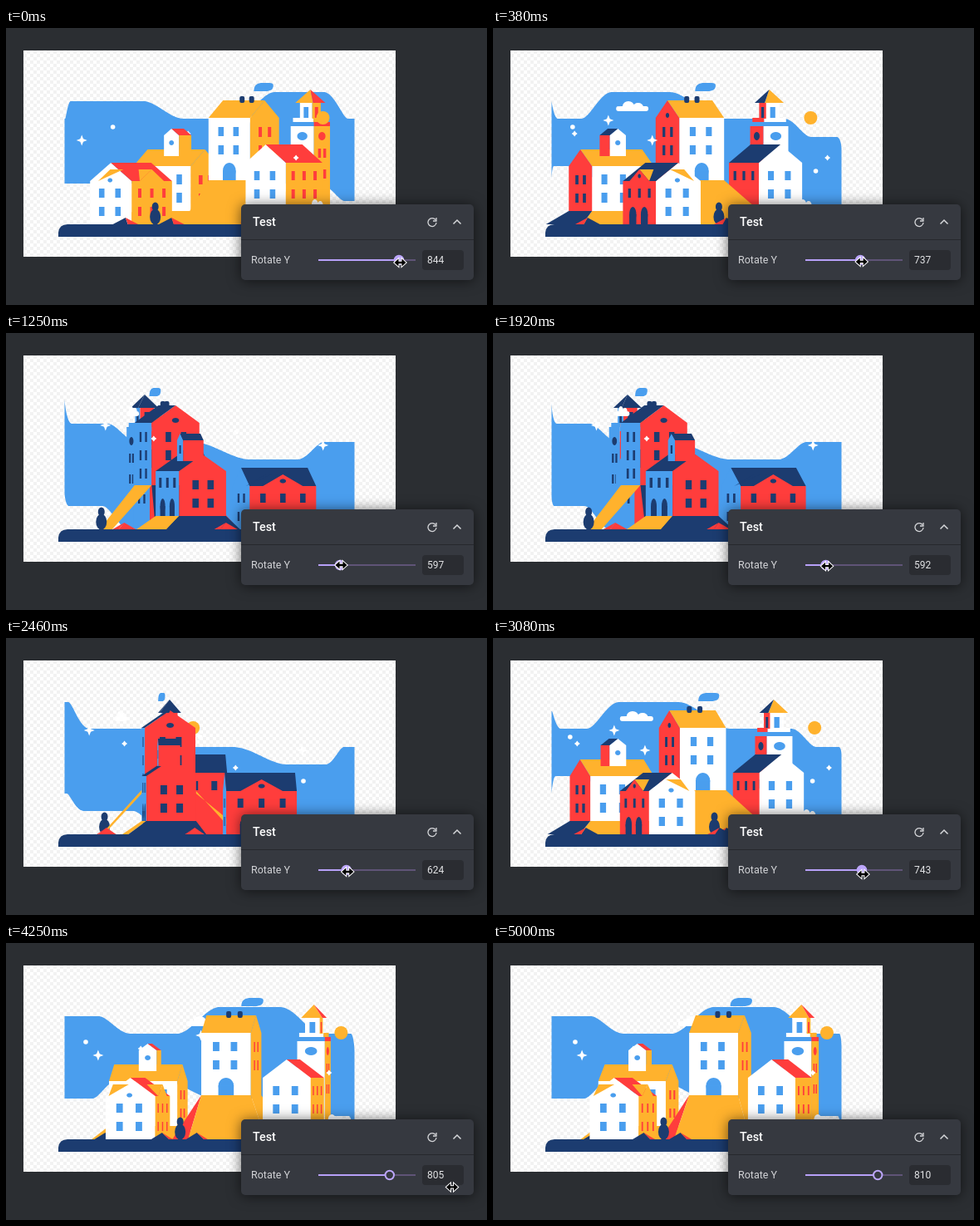
These frames come from a looping animation (579 by 333 pixels, 5.04 s). An HTML page with a canvas:

```html
<!DOCTYPE html>
<html lang="en">
<head>
<meta charset="utf-8">
<style>
html, body { margin: 0; width: 100%; height: 100%; overflow: hidden; background: #2b2e32; }
body { position: relative; font-family: Roboto, Inter, sans-serif; }
body > * { position: absolute; }
#paper { left: 21px; top: 27px; width: 448px; height: 248px;
  background: repeating-conic-gradient(#f2f2f2 0 25%, #fff 0 50%) 0 0 / 8px 8px; }
canvas, svg { left: 0; top: 0; width: 579px; height: 333px; }
#panel { left: 283px; top: 212px; width: 280px; height: 91px; border-radius: 5px;
  background: #363940; box-shadow: 0 1px 16px #0009; }
</style>
</head>
<body>
<div id="paper"></div>
<canvas></canvas>
<div id="panel"></div>
<svg viewBox="0 0 579 333" fill="none">
  <path d="M283 254.5H563" stroke="#26282d"/>
  <text x="297" y="238" font-size="14.3" font-weight="500" fill="#fff">Test</text>
  <path d="M517 230.5A5 5 0 1 0 518 234M518 228v4h-4" stroke="#d5d6d9" stroke-width="1.3"/>
  <path d="M538.5 235.5l4.5-4.5 4.5 4.5" stroke="#d5d6d9" stroke-width="1.5"/>
  <text x="295" y="283" font-size="12.5" fill="#d2d3d6">Rotate Y</text>
  <path d="M376 279H493" stroke="#5f5477" stroke-width="2"/>
  <path id="fill" stroke="#b7a0f8" stroke-width="2"/>
  <circle id="knob" cy="279" r="5.2" stroke="#bca6fb" stroke-width="2"/>
  <rect x="501" y="267" width="50" height="24" rx="4" fill="#2a2c31"/>
  <text id="value" x="507" y="283" font-size="12" fill="#e2e3e5"></text>
  <path id="cursor" d="M-7 0l5-4.5V-1.2H2V-4.5l5 4.5-5 4.5V1.2H-2V4.5z" fill="#000" stroke="#fff" stroke-width="2" paint-order="stroke"/>
</svg>
<script>
const $ = id => document.getElementById(id);
const canvas = document.querySelector('canvas'), ctx = canvas.getContext('2d');
const dpr = window.devicePixelRatio || 1;
canvas.width = 579 * dpr;
canvas.height = 333 * dpr;

const RED = '#ff3d3c', GOLD = '#ffb22d', BLUE = '#4a9eee', NAVY = '#1c3c70', WHITE = '#fff';
// Sides in order: front, right, back, left
const WALLS = [WHITE, GOLD, BLUE, RED];
const ROOFS = [GOLD, RED, NAVY, NAVY];
const PANES = [BLUE, RED, NAVY, NAVY];
const LOOP = 5040, CX = 245, RADIUS = 174.5;

const VALUES = [[0, 844], [710, 657], [1250, 597], [1750, 588], [2460, 624], [3080, 743],
  [3670, 799], [4000, 803], [5040, 810]];
const CURSOR_Y = [[0, 282], [710, 280], [1250, 279], [2460, 281], [3080, 284], [3670, 285], [3860, 286], [4330, 294]];
const SKY_TOP = [[-135, 109], [-120, 109], [-108, 88], [-62, 88], [-45, 109], [-25, 109], [-8, 77], [17, 77],
  [38, 109], [65, 109], [80, 131], [103, 131], [126, 152], [147, 152], [162, 131], [205, 131], [225, 109]];
const SKY_BOTTOM = [[-135, 187], [-66, 187], [-52, 166], [-30, 166], [-10, 187], [14, 187], [34, 208],
  [62, 208], [76, 236], [200, 236], [225, 187]];

let cos, sin, items;
const mix = (a, b, u) => a + (b - a) * u;
const smooth = u => u * u * (3 - 2 * u);

function segment(keys, t) {
  let i = 0;
  while (i < keys.length - 2 && t >= keys[i + 1][0]) i++;
  return [i, Math.min(1, (t - keys[i][0]) / (keys[i + 1][0] - keys[i][0]))];
}
function eased(keys, t) {
  const [i, u] = segment(keys, t);
  return mix(keys[i][1], keys[i + 1][1], smooth(u));
}
function spline(keys, t) {
  const [i, u] = segment(keys, t), [a, b] = [keys[i], keys[i + 1]];
  const slope = j => {
    const p = keys[Math.max(0, j - 1)], q = keys[Math.min(keys.length - 1, j + 1)];
    return (q[1] - p[1]) / (q[0] - p[0]) * (b[0] - a[0]);
  };
  return mix(a[1], b[1], smooth(u)) + slope(i) * u * (1 - u) ** 2 - slope(i + 1) * u * u * (1 - u);
}

const px = (x, z) => CX + x * cos - z * sin;
const depth = (x, z) => x * sin + z * cos;
const add = (x, z, draw) => items.push({ z: depth(x, z), draw });

// Points are [x, z, y], clockwise as seen from outside; faces turned away are skipped.
function face(color, ...points) {
  const p = points.map(([x, z, y]) => [px(x, z), y]);
  let area = 0;
  p.forEach(([x, y], i) => {
    const [nx, ny] = p[(i + 1) % p.length];
    area += x * ny - nx * y;
  });
  if (area <= 0) return;
  ctx.fillStyle = color;
  ctx.beginPath();
  p.forEach(q => ctx.lineTo(...q));
  ctx.fill();
}
const ring = (x0, x1, z0, z1) => [[x0, z1], [x1, z1], [x1, z0], [x0, z0]];
const along = (a, b, u) => [mix(a[0], b[0], u), mix(a[1], b[1], u)];

function frustum(top, y0, bottom, y1, colors) {
  for (let i = 0; i < 4; i++) {
    const j = (i + 1) % 4;
    face(colors[i], [...top[i], y0], [...top[j], y0], [...bottom[j], y1], [...bottom[i], y1]);
  }
}
const box = (r, y0, y1, colors = WALLS) => frustum(r, y0, r, y1, colors);

// Gables stand on side k and the side opposite.
function roof(r, k, ridge, eave) {
  const [a, b, c, d] = [0, 1, 2, 3].map(i => [...r[(k + i) % 4], eave]);
  const m = [...along(a, b, .5), ridge], n = [...along(c, d, .5), ridge];
  face(WALLS[k], m, b, a);
  face(WALLS[(k + 2) % 4], n, d, c);
  face(ROOFS[(k + 1) % 4], m, n, c, b);
  face(ROOFS[(k + 3) % 4], n, m, a, d);
}
function pane(r, side, u, y, w, h, color = PANES[side]) {
  const a = r[side], b = r[(side + 1) % 4], du = w / 2 / Math.hypot(b[0] - a[0], b[1] - a[1]);
  const l = along(a, b, u - du), q = along(a, b, u + du);
  face(color, [...l, y], [...q, y], [...q, y + h], [...l, y + h]);
}
function oval(r, side, u, y, w, h) {
  const a = r[side], b = r[(side + 1) % 4], len = Math.hypot(b[0] - a[0], b[1] - a[1]);
  const pts = Array.from({ length: 20 }, (_, i) => {
    const t = i * Math.PI / 10;
    return [...along(a, b, u + Math.cos(t) * w / 2 / len), y + Math.sin(t) * h / 2];
  });
  face(PANES[side], ...pts);
}
function door(r, side, u, y, w, h) {
  oval(r, side, u, y + w / 2, w, w);
  pane(r, side, u, y + w / 2, w, h - w / 2);
}
function grid(r, side, cols, rows, w, h) {
  for (const u of cols) for (const y of rows) pane(r, side, u, y, w, h);
}
function dormer(r, side, ridge, top, eave) {
  const a = r[side], b = r[(side + 1) % 4], c = r[(side + 2) % 4], d = r[(side + 3) % 4];
  const l = [...along(a, b, .2), eave], q = [...along(a, b, .8), eave], apex = [...along(a, b, .5), top];
  const inner = [...along(apex, along(c, d, .5), (eave - top) / (eave - ridge) / 2), top];
  const colors = side === 3 ? [GOLD, NAVY] : [NAVY, GOLD];
  face(colors[0], apex, inner, q);
  face(colors[1], inner, apex, l);
  face(WALLS[side], apex, q, l);
}

const T = ring(-14, 47, -79, -18), B = ring(-107, -46, 13, 98), C = ring(-129, -45, -85, -25), D = ring(71, 130, -51, 26);
const CUPOLA = ring(-96, -74, -68, -42);
const square = (x, z, r) => ring(x - r, x + r, z - r, z + r);
const THIRDS = [.35, .67], FINE = [.2, .5, .8];

function tallHouse() {
  box(T, 108, 183);
  roof(T, 1, 87, 108);
  grid(T, 0, [.3, .66], [119, 141], 8, 11);
  door(T, 0, .5, 162, 19, 21);
  for (const s of [1, 2, 3]) grid(T, s, THIRDS, [119, 141], 7, 12);
  grid(T, 2, THIRDS, [163], 7, 12);
  oval(T, 3, .5, 105, 9, 6);
  for (const x of [13, 27]) {
    shape(NAVY, () => ctx.roundRect(px(x, -50) - 3, 82, 6, 8, 2));
  }
}
function hill() {
  const [fl, fr, br, bl] = T.map(p => [...p, 183]);
  const corner = [-20, 30, 236], west = [-50, -20, 236], back = [-42, -84, 236];
  const south = [80, 50, 236], east = [80, -85, 236];
  face(GOLD, br, bl, [-10, -128, 236], [35, -128, 236]);
  face(GOLD, fr, br, east, south);
  face(NAVY, bl, fl, west, back);
  face(RED, fl, corner, west);
  face(GOLD, fl, fr, south, corner);
}
function gableHouse(r, ridge, eave, row) {
  box(r, eave, 236);
  roof(r, 0, ridge, eave);
  grid(r, 0, [.28, .67], [row, row + 22], 8, 11);
  grid(r, 1, FINE, [row, row + 22], 7, 11);
  grid(r, 2, THIRDS, [row, row + 22], 7, 11);
  grid(r, 3, FINE, [row], 7, 11);
}
function frontHouse() {
  gableHouse(B, 162, 184, 193);
  oval(B, 0, .48, 183, 7, 5);
  for (const u of [.3, .65]) door(B, 3, u, 215, 18, 21);
  dormer(B, 1, 162, 170, 184);
  dormer(B, 3, 162, 170, 184);
  oval(B, 3, .5, 178, 8, 5);
}
function leftHouse() {
  frustum(C, 220, ring(-148, -41, -108, -14), 236, [GOLD, GOLD, GOLD, NAVY]);
  box(C, 166, 220);
  roof(C, 1, 146, 166);
  grid(C, 0, FINE, [176, 198], 8, 12);
  for (const s of [1, 3]) grid(C, s, THIRDS, [177, 199], 8, 11);
  grid(C, 2, FINE, [174], 9, 12);
  for (const u of [.3, .7]) door(C, 2, u, 199, 18, 21);
  box(CUPOLA, 129, 154);
  roof(CUPOLA, 0, 121, 129);
  oval(CUPOLA, 0, .5, 138, 7, 6);
  pane(CUPOLA, 2, .5, 135, 6, 10);
}
function tower() {
  const [x, z] = [120, -40], body = square(x, z, 17), top = square(x, z, 9), tip = square(x, z, 0);
  box(body, 118, 236);
  for (let s = 0; s < 4; s++) oval(body, s, .5, 130, 15, 10);
  for (const s of [1, 2, 3]) grid(body, s, THIRDS, [145, 170], 6, 11);
  box(square(x, z, 15), 108, 113);
  box(square(x, z, 17), 113, 118, [BLUE, RED, BLUE, BLUE]);
  box(top, 90, 109);
  for (let s = 0; s < 4; s++) pane(top, s, .5, 95, 7, 13);
  frustum(tip, 74, square(x, z, 13), 90, ROOFS);
}

function shape(color, path) {
  ctx.fillStyle = color;
  ctx.beginPath();
  path();
  ctx.fill();
}
function star(x, y, r, pinch) {
  for (let i = 0; i < 8; i++) {
    const a = i * Math.PI / 4, d = i % 2 ? r * pinch : r;
    ctx.lineTo(x + d * Math.cos(a), y + d * Math.sin(a));
  }
}
const dot = (x, y, r) => ctx.arc(x, y, r, 0, 7);
const sprite = (x, z, color, draw) => add(x, z, () => shape(color, () => draw(px(x, z))));

function cloud(x, z, y, w) {
  sprite(x, z, WHITE, c => {
    const k = w * Math.max(.35, Math.abs(cos));
    ctx.roundRect(c - k / 2, y - 1, k, 6, 3);
    ctx.ellipse(c - k * .12, y - 1, k * .18, 6, 0, 0, 7);
    ctx.ellipse(c + k * .18, y, k * .16, 5, 0, 0, 7);
  });
}
function smoke() {
  const x = px(41, -55), w = 3.5 + 10 * Math.abs(cos);
  shape(BLUE, () => {
    ctx.moveTo(x - w, 76);
    ctx.bezierCurveTo(x - w, 68, x - w * .6, 66, x - w * .1, 66);
    ctx.lineTo(x + w * .6, 66);
    ctx.quadraticCurveTo(x + w, 66, x + w, 69);
    ctx.bezierCurveTo(x + w, 74, x + w * .7, 76, x + w * .2, 76);
  });
}
function tree(x, z) {
  sprite(x, z, NAVY, c => {
    ctx.ellipse(c, 227, 6.5, 9.5, 0, 0, 7);
    ctx.ellipse(c, 215, 4, 5.5, 0, 0, 7);
  });
}
function tent(x, z) {
  add(x, z, () => frustum(square(x, z, 0), 228, square(x, z, 11), 236, [NAVY, RED, RED, RED]));
}

function sky(angle) {
  const edge = (keys, x) => {
    const a = Math.asin(x / RADIUS) * 180 / Math.PI - angle;
    return eased(keys, ((a + 135) % 360 + 360) % 360 - 135);
  };
  // Even steps in angle keep the steep ends of the band smooth.
  const xs = Array.from({ length: 361 }, (_, i) => RADIUS * Math.sin((i / 2 - 90) * Math.PI / 180));
  shape(BLUE, () => {
    for (const x of xs) ctx.lineTo(CX + x, edge(SKY_TOP, x));
    for (const x of xs.reverse()) ctx.lineTo(CX + x, edge(SKY_BOTTOM, x));
  });
}

function town(value) {
  const angle = (value - 784.5) * .585;
  cos = Math.cos(angle * Math.PI / 180);
  sin = Math.sin(angle * Math.PI / 180);
  items = [];
  ctx.setTransform(dpr, 0, 0, dpr, 0, 0);
  ctx.clearRect(0, 0, 579, 333);
  sky(angle);

  add(16, -49, hill);
  add(16, -48, tallHouse);
  add(-77, 56, frontHouse);
  add(-87, -56, leftHouse);
  add(100, -13, () => gableHouse(D, 140, 162, 172));
  add(120, -40, tower);
  add(41, -55, smoke);
  sprite(160, -9, GOLD, x => dot(x, 108, 8));
  sprite(-115, 104, WHITE, x => star(x, 135, 6.5, .4));
  sprite(-42, -148, WHITE, x => star(x, 111, 6.5, .4));
  sprite(-108, -110, WHITE, x => star(x, 127, 3.5, .6));
  sprite(156, 42, WHITE, x => star(x, 156, 3.5, .6));
  sprite(-157, -22, WHITE, x => dot(x, 119, 2.8));
  sprite(99, 120, WHITE, x => dot(x, 172, 2.8));
  cloud(-30, -109, 95, 44);
  cloud(152, -8, 213, 26);
  tree(-17, 90);
  tree(40, -124);
  tent(-30, 134);
  tent(2, 83);
  tent(-53, -128);
  tent(-134, -27);

  items.sort((a, b) => a.z - b.z).forEach(item => item.draw());
  shape(NAVY, () => {
    ctx.moveTo(63, 251);
    ctx.lineTo(63, 246);
    ctx.quadraticCurveTo(64, 236, 74, 236);
    ctx.lineTo(416, 236);
    ctx.quadraticCurveTo(426, 236, 427, 246);
    ctx.lineTo(427, 251);
  });
}

function frame(now) {
  const t = now % LOOP, value = Math.round(spline(VALUES, t));
  const x = 402 + (value - 597) * .2874;
  town(value);
  $('value').textContent = value;
  $('fill').setAttribute('d', `M376 279H${x}`);
  $('knob').setAttribute('cx', x);
  $('knob').setAttribute('fill', t < 3950 ? '#bca6fb' : '#363940');
  // After the drag the pointer drifts off across the number field.
  const leave = smooth(Math.min(1, Math.max(0, (t - 3860) / 470)));
  $('cursor').setAttribute('transform', `translate(${mix(x + 1.5, 543, leave)} ${eased(CURSOR_Y, t)})`);
  $('cursor').setAttribute('visibility', t < 4420 ? 'visible' : 'hidden');
  requestAnimationFrame(frame);
}
requestAnimationFrame(frame);
</script>
</body>
</html>
```
